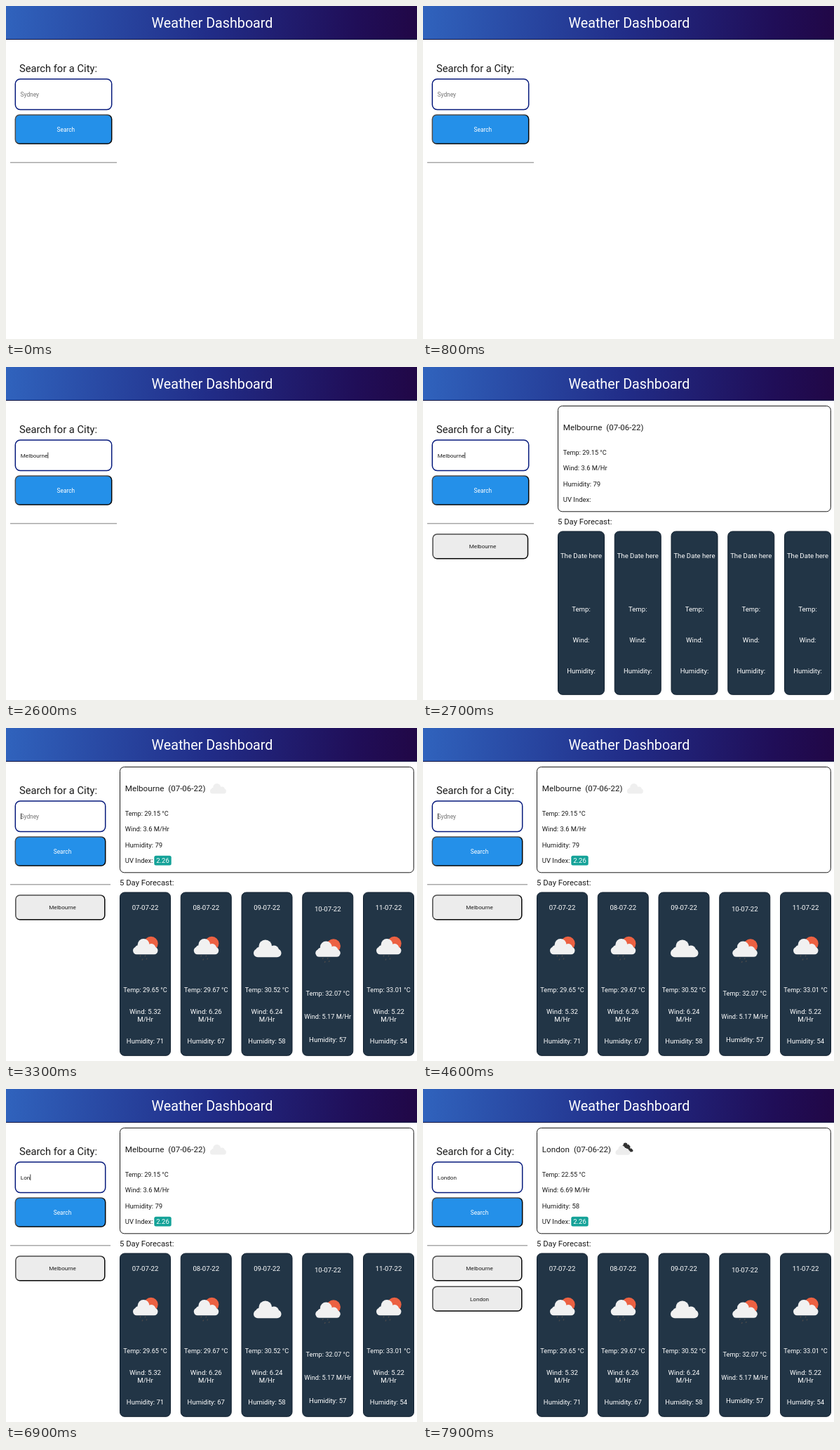
An HTML page with a canvas that plays this animation: 586x474 px, repeating every 8000 ms.

```html
<!DOCTYPE html>
<html lang="en">
<head>
<meta charset="utf-8">
<title>Weather Dashboard</title>
<style>
  html, body { margin: 0; width: 100%; height: 100%; overflow: hidden; background: #fff; }
  canvas { display: block; width: 586px; height: 474px; }
</style>
</head>
<body>
<canvas id="stage"></canvas>
<script>
const W = 586, H = 474, LOOP = 8000;
const canvas = document.getElementById('stage');
const ctx = canvas.getContext('2d');
const dpr = window.devicePixelRatio || 1;
canvas.width = W * dpr;
canvas.height = H * dpr;

// Key times in ms
const FIRST_KEYS = [1050, 1250, 1450, 1600, 1750, 1850, 2000, 2100, 2250];
const SECOND_KEYS = [6500, 6700, 6850, 7000, 7150, 7250];
const FIRST_RESULT = 2700, FORECAST = 2900, SECOND_RESULT = 7800;
const BLINK = 500;

const NARROW = { field: 129, rule: 143, label: 80.5, past: 127, pastX: 13.8, pastLabel: 80.5,
  panel: 162.5, days: 162, step: 86.75, dayW: 73 };
const WIDE = { field: 138, rule: 152, label: 85.3, past: 135.5, pastX: 14, pastLabel: 85,
  panel: 192.5, days: 192, step: 80.75, dayW: 67 };

const MELBOURNE = { city: 'Melbourne', temp: '29.15', wind: '3.6', humidity: 79 };
const LONDON = { city: 'London', temp: '22.55', wind: '6.69', humidity: 58 };
const DAYS = [
  { date: '07-07-22', temp: '29.65', wind: '5.32', humidity: 71, rain: true },
  { date: '08-07-22', temp: '29.67', wind: '6.26', humidity: 67, rain: true },
  { date: '09-07-22', temp: '30.52', wind: '6.24', humidity: 58 },
  { date: '10-07-22', temp: '32.07', wind: '5.17', humidity: 57, rain: true, oneLine: true },
  { date: '11-07-22', temp: '33.01', wind: '5.22', humidity: 54, rain: true }
];

// y is the middle of the capitals; returns the text width
function text(str, x, y, size, color = '#1a1a1a', align = 'left', weight = 400) {
  ctx.font = `${weight} ${size}px Roboto, sans-serif`;
  ctx.textAlign = align;
  ctx.fillStyle = color;
  ctx.fillText(str, x, y + size * 0.355);
  return ctx.measureText(str).width;
}

function box(x, y, w, h, r, fill, stroke, line = 1) {
  ctx.beginPath();
  ctx.roundRect(x, y, w, h, r);
  if (fill) { ctx.fillStyle = fill; ctx.fill(); }
  if (stroke) { ctx.strokeStyle = stroke; ctx.lineWidth = line; ctx.stroke(); }
}

function disc(x, y, r, fill) {
  ctx.beginPath();
  ctx.arc(x, y, r, 0, Math.PI * 2);
  ctx.fillStyle = fill;
  ctx.fill();
}

// Outset edge: grey top and left, black bottom and right, split on the diagonal
function button(x, y, w, h, fill) {
  const cx = x + w / 2, cy = y + h / 2, dx = h * h / w / 2, dy = h / 2;
  const edge = ctx.createLinearGradient(cx - dx, cy - dy, cx + dx, cy + dy);
  edge.addColorStop(0.45, '#4c4c4c');
  edge.addColorStop(0.55, '#050505');
  box(x, y, w, h, 6, fill, edge, 1.5);
}

function cloud(x, y, w, fill) {
  const s = w / 40;
  box(x, y + 13 * s, w, 12 * s, 6 * s, fill);
  disc(x + 17 * s, y + 9.5 * s, 9.5 * s, fill);
  disc(x + 9 * s, y + 16 * s, 6 * s, fill);
  disc(x + 29.5 * s, y + 15 * s, 7 * s, fill);
}

function rainIcon(x, y) {
  disc(x + 44.7, y - 6.7, 10, '#ec6142');
  cloud(x + 19, y - 13.5, 35.5, '#f1f1f1');
  ctx.strokeStyle = '#4a4a4c';
  ctx.lineWidth = 1.4;
  ctx.beginPath();
  for (const [dx, dy] of [[30, 10], [37, 10], [33, 15], [39, 14]]) {
    ctx.moveTo(x + dx, y + dy);
    ctx.lineTo(x + dx - 1, y + dy + 2);
  }
  ctx.stroke();
}

function header() {
  const sky = ctx.createLinearGradient(0, 0, W, 47);
  sky.addColorStop(0, '#3063bd');
  sky.addColorStop(0.5, '#212c87');
  sky.addColorStop(0.85, '#200e58');
  sky.addColorStop(1, '#210746');
  ctx.fillStyle = sky;
  ctx.fillRect(0, 0, W, 47);
  ctx.fillStyle = '#10123f';
  ctx.fillRect(0, 47, W, 1);
  text('Weather Dashboard', 294, 24, 19.7, '#fff', 'center');
}

function sidebar(l, typed, caret, past) {
  text('Search for a City:', 19, 88.5, 14.7);
  box(13.3, 104, l.field - 0.6, 43.5, 7, '#fff', '#061a7c', 1.5);
  const shown = typed
    ? text(typed, 20.8, 126, 8.1)
    : (text('Sydney', 20.5, 126, 8.4, '#757575'), 0);
  if (caret) {
    ctx.fillStyle = '#111';
    ctx.fillRect(21 + shown, 121.5, 0.8, 8.5);
  }
  button(13.3, 155, l.field - 0.6, 41, '#2490e9');
  text('Search', l.label, 176, 8.3, '#fff', 'center');
  ctx.fillStyle = '#a8a8a8';
  ctx.fillRect(6, 222, l.rule, 1);
  ctx.fillStyle = '#d4d4d4';
  ctx.fillRect(6, 223, l.rule, 1);
  past.forEach((city, i) => {
    const y = 238 + i * 43.3;
    button(l.pastX, y, l.past, 34.8, '#ececec');
    text(city, l.pastLabel, y + 17.5, 8.1, '#1a1a1a', 'center');
  });
}

function current(l, now, ready) {
  const x = l.panel + 7.3;
  box(l.panel, 55.5, 581.3 - l.panel, 150.3, 6, '#fff', '#1a1a1a');
  const dateX = x + text(now.city, x, 85.8, 11.7) + 6;
  const iconX = dateX + text('(07-06-22)', dateX, 85.8, 11.5) + 6.5;
  if (now === LONDON) {
    cloud(iconX + 9, 76.5, 12, '#333');
    cloud(iconX + 13, 82, 12, '#333');
    cloud(iconX, 80.5, 21, '#ededed');
  } else if (ready) {
    cloud(iconX, 79, 23, '#efefef');
  }
  text(`Temp: ${now.temp} °C`, x, 121.5, 9.1);
  text(`Wind: ${now.wind} M/Hr`, x, 144, 9.4);
  text(`Humidity: ${now.humidity}`, x, 167, 9.5);
  text('UV Index:', x, 189, 9.5);
  if (ready) {
    box(211.3, 181.8, 24.4, 13.7, 2.5, '#14a298');
    text('2.26', 223.5, 188.8, 9.5, '#fff', 'center');
  }
}

function forecast(l, ready) {
  text('5 Day Forecast:', l.panel - 0.5, 220.2, 11.3);
  DAYS.forEach((day, i) => {
    const x = l.days + i * l.step, mid = x + l.dayW / 2;
    const put = (str, y, size = 9.6) => text(str, mid, y, size, '#fff', 'center');
    box(x + 0.5, 234, l.dayW - 1, 232.3, 6.5, '#223546', '#101f2e', 1);
    if (!ready) {
      put('The Date here', 268.5);
      put('Temp:', 344.5);
      put('Wind:', 388.7);
      put('Humidity:', 433);
      return;
    }
    const low = day.oneLine;
    put(day.date, low ? 257.5 : 255.5);
    if (day.rain) rainIcon(x, low ? 317 : 313.5);
    else cloud(x + 17.5, 301.5, 39.5, '#f1f1f1');
    put(`Temp: ${day.temp} °C`, low ? 378 : 372.5, 9.2);
    if (low) {
      put(`Wind: ${day.wind} M/Hr`, 410.5, 9.2);
    } else {
      put(`Wind: ${day.wind}`, 403.5);
      put('M/Hr', 414.5);
    }
    put(`Humidity: ${day.humidity}`, low ? 443.3 : 445.3, 9.5);
  });
}

function draw(t) {
  const ready = t >= FORECAST;
  const layout = ready ? NARROW : WIDE;
  const keys = ready ? SECOND_KEYS : FIRST_KEYS;
  const name = ready ? LONDON.city : MELBOURNE.city;
  const count = keys.filter(k => k <= t).length;

  // The caret restarts its blink at each key press
  const lastKey = count ? keys[count - 1] : ready ? FIRST_KEYS[8] : -750;
  const caret = (t - lastKey) % (2 * BLINK) < BLINK;

  const past = [];
  if (t >= FIRST_RESULT) past.push(MELBOURNE.city);
  if (t >= SECOND_RESULT) past.push(LONDON.city);

  ctx.setTransform(dpr, 0, 0, dpr, 0, 0);
  ctx.fillStyle = '#fff';
  ctx.fillRect(0, 0, W, H);
  header();
  sidebar(layout, name.slice(0, count), caret, past);
  if (t >= FIRST_RESULT) {
    current(layout, t >= SECOND_RESULT ? LONDON : MELBOURNE, ready);
    forecast(layout, ready);
  }
}

const start = performance.now();
function tick() {
  draw((performance.now() - start) % LOOP);
  requestAnimationFrame(tick);
}
tick();
</script>
</body>
</html>
```
